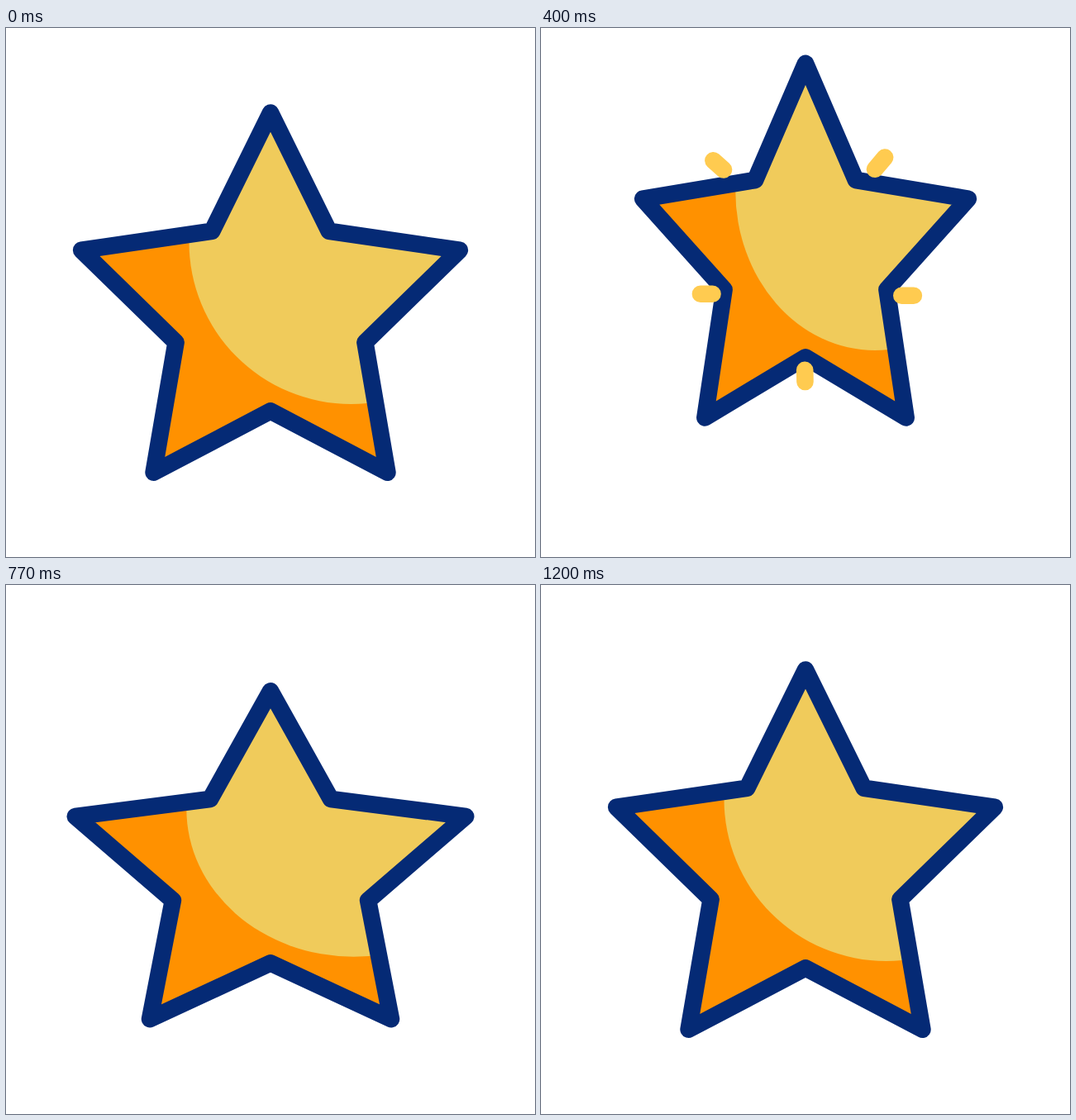
Write an HTML page that moves like this. It is 640 px wide and 640 px high and loops after 1.57 s.

```html
<!DOCTYPE html>
<html lang="en">
<head>
<meta charset="utf-8">
<title>Bouncing star</title>
<style>
  html, body { margin: 0; width: 100%; height: 100%; overflow: hidden; background: #fff; }
  svg { display: block; width: 100%; height: 100%; }
  #outline { stroke: #052a75; }
  #rays { stroke: #ffcb50; }
  #outline, #rays { fill: none; stroke-width: 20.6; stroke-linecap: round; stroke-linejoin: round; }
</style>
</head>
<body>
<svg viewBox="0 0 640 640">
  <defs><clipPath id="body"><path id="mask"/></clipPath></defs>
  <g clip-path="url(#body)">
    <rect width="640" height="640" fill="#ff9100"/>
    <ellipse id="shine" fill="#f0cb5b"/>
  </g>
  <path id="outline"/>
  <path id="rays"/>
</svg>
<script>
const LOOP = 1570, FPS = 30, LAST = 36, MID = 320;
const RADIUS = 240.6, HALF_HEIGHT = 217.5;
const el = id => document.getElementById(id);
const mask = el('mask'), shine = el('shine'), outline = el('outline'), rays = el('rays');

const mix = (a, b, p) => a + (b - a) * p;
const path = points => 'M' + points.map(p => p.join(' ')).join('L');
function ease(step, from, to) {
  const u = Math.min(1, Math.max(0, (step - from) / (to - from)));
  return u * u * (3 - 2 * u);
}

// Regular star, inner corners at half the radius, centred by its height
const corners = Array.from({ length: 10 }, (_, i) => {
  const r = i % 2 ? RADIUS / 2 : RADIUS, a = i * Math.PI / 5;
  return [r * Math.sin(a), RADIUS - HALF_HEIGHT - r * Math.cos(a)];
});

// Poses; the squashed star keeps its feet on the ground
const rest = { y: 0, sx: 1, sy: 1 };
const leap = { y: -76, sx: 0.826, sy: 1.001 };
const squash = { y: HALF_HEIGHT * (1 - 0.873), sx: 1.098, sy: 0.873 };
const hop = { y: -47.6, sx: 0.862, sy: 1.012 };

// Each move eases into its pose between two steps
const moves = [
  { from: 0, to: 9.3, pose: leap },
  { from: 10, to: 19, pose: squash },
  { from: 19.8, to: 29, pose: hop },
  { from: 29, to: 35.2, pose: rest }
];

function poseAt(step) {
  return moves.reduce((p, { from, to, pose }) => {
    const k = ease(step, from, to);
    return { y: mix(p.y, pose.y, k), sx: mix(p.sx, pose.sx, k), sy: mix(p.sy, pose.sy, k) };
  }, rest);
}

// Root, direction in degrees and length
const beams = [
  { x: 221, y: 219.7, angle: 221.7, length: 145 },
  { x: 404, y: 219, angle: -49.7, length: 161 },
  { x: 207.5, y: 370, angle: 180, length: 125 },
  { x: 436.3, y: 372, angle: 0, length: 125 },
  { x: 319.2, y: 462, angle: 88.9, length: 122 }
];

function rayPath(step, shift) {
  const tail = ease(step, 12, 23), head = ease(step, 10, 19.4);
  if (head <= 0 || tail >= 1) return '';
  const dy = 0.75 * shift - 1;
  return beams.map(({ x, y, angle, length }) => {
    const a = angle * Math.PI / 180;
    const at = p => [x + p * length * Math.cos(a), y + dy + p * length * Math.sin(a)];
    return path([at(tail), at(head)]);
  }).join('');
}

function draw(step) {
  const { y, sx, sy } = poseAt(step);
  const place = ([px, py]) => [MID + px * sx, MID + y + py * sy];
  const d = path(corners.map(place)) + 'Z';
  mask.setAttribute('d', d);
  outline.setAttribute('d', d);
  const [cx, cy] = place([97.5, -61]);
  const oval = { cx, cy, rx: 196 * sx, ry: 196 * sy };
  for (const name in oval) shine.setAttribute(name, oval[name]);
  rays.setAttribute('d', rayPath(step, y));
}

const start = performance.now();
function tick(now) {
  const t = Math.max(0, now - start) % LOOP;
  // 30 steps a second, on a 10 ms grid
  const step = Math.floor((Math.floor(t / 10) * 10 + 5) * FPS / 1000);
  draw(Math.min(LAST, step));
  requestAnimationFrame(tick);
}
tick(start);
</script>
</body>
</html>
```
